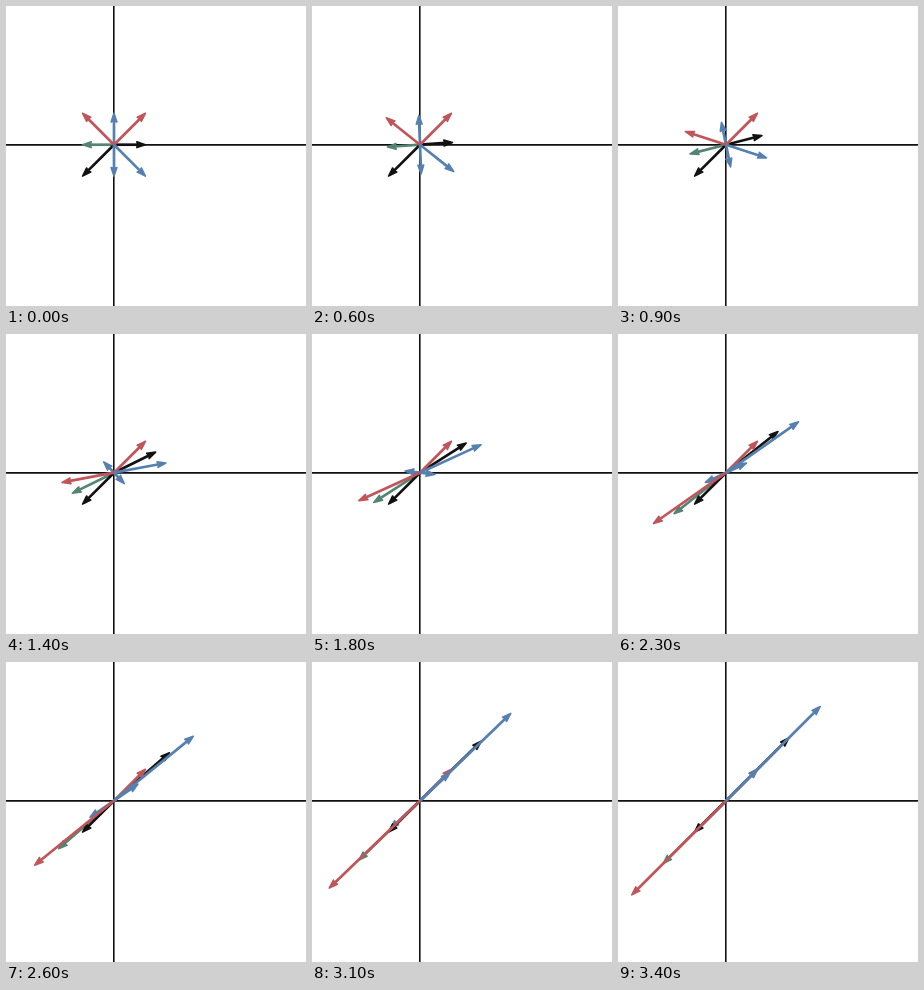
An HTML page that plays this animation: 300x300 px, repeating every 5 s.

```html
<!DOCTYPE html>
<html lang="en">
<head>
<meta charset="utf-8">
<title>Linear map of eight vectors</title>
<style>
html, body { margin: 0; width: 100%; height: 100%; overflow: hidden; background: #fff; }
svg { display: block; width: 100vw; height: 100vh; }
</style>
</head>
<body>
<svg id="stage" viewBox="0 0 300 300">
  <path d="M0 138.9H300M107.8 0V300" stroke="#111" stroke-width="1.6" fill="none"/>
</svg>
<script>
const LOOP = 5000, START = 600, STEP = 100, STEPS = 27.5;
const ORIGIN = [108, 138.7], UNIT = 31.4;
const RED = '#c0565a', BLUE = '#5580b0', GREEN = '#548474', INK = '#121212';

// Eighth turns from the x axis, painted back to front
const vectors = [
  [2, BLUE], [0, INK], [1, RED], [4, GREEN],
  [5, INK], [6, BLUE], [3, RED], [7, BLUE]
];

const stage = document.getElementById('stage');
function add(parent, name, attrs) {
  const el = document.createElementNS('http://www.w3.org/2000/svg', name);
  for (const key in attrs) el.setAttribute(key, attrs[key]);
  return parent.appendChild(el);
}

const arrows = vectors.map(([turn, color]) => {
  const angle = turn * Math.PI / 4;
  const group = add(stage, 'g', { fill: color, stroke: color, 'stroke-linejoin': 'round' });
  return {
    x: Math.round(Math.cos(angle)),
    y: Math.round(Math.sin(angle)),
    group,
    shaft: add(group, 'line', { 'stroke-width': 2.7 }),
    head: add(group, 'path', { d: 'M0 0L-8.6 -2.9L-7.6 0L-8.6 2.9Z', 'stroke-width': 1.6 })
  };
});

function draw(time) {
  const step = time < START ? 0 : Math.floor((time - START) / STEP) + 1;
  const t = Math.min(1, step / STEPS);
  for (const { x, y, group, shaft, head } of arrows) {
    // Blend from the identity to the matrix [[2, -1], [2, -1]]
    const image = 2 * x - y;
    const px = (x + (image - x) * t) * UNIT;
    const py = -(y + (image - y) * t) * UNIT;
    const length = Math.hypot(px, py);
    const angle = Math.atan2(py, px) * 180 / Math.PI;
    group.setAttribute('transform', `translate(${ORIGIN}) rotate(${angle})`);
    shaft.setAttribute('x2', length - 7);
    head.setAttribute('transform', `translate(${length})`);
  }
}

const begin = performance.now();
function tick() {
  draw((performance.now() - begin) % LOOP);
  requestAnimationFrame(tick);
}
tick();
</script>
</body>
</html>
```
